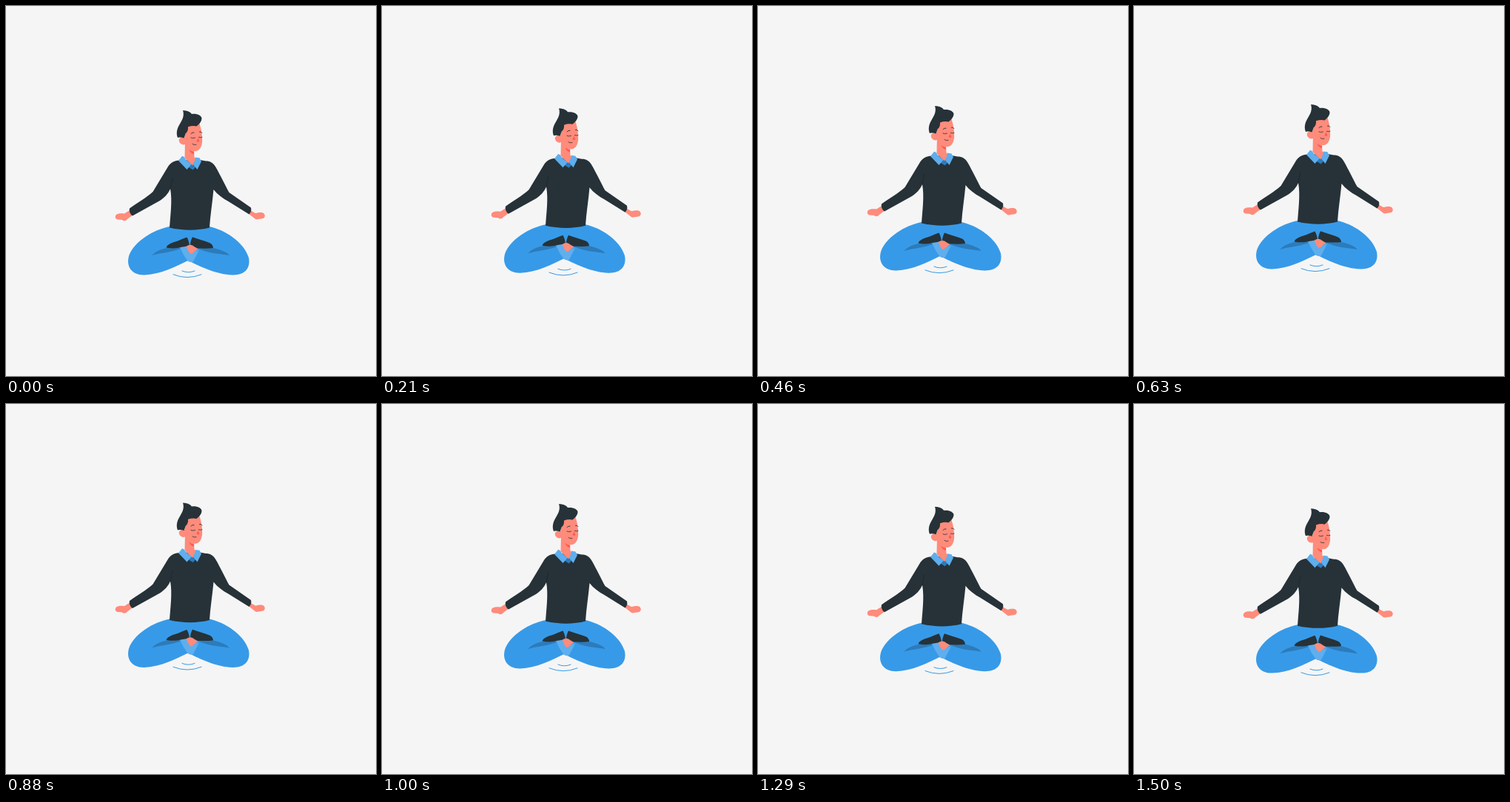
An HTML page that plays this animation: 500x500 px, repeating every 1540 ms.

```html
<!DOCTYPE html>
<html lang="en">
<head>
<meta charset="utf-8">
<title>Floating meditation</title>
<style>
  html, body { margin: 0; width: 100%; height: 100%; overflow: hidden; background: #f5f5f5; }
  svg { display: block; width: 100%; height: 100%; }
  .blue { fill: #379ae8; }
  .fold { fill: #2c7bba; }
  .light { fill: #5faeed; }
  .dark { fill: #263238; }
  .skin { fill: #ff8b7b; }
  .red { fill: #ff5652; }
  .line { fill: none; stroke: #263238; stroke-width: .9; stroke-linecap: round; }
  .arc { fill: none; stroke: #379ae8; stroke-linecap: round; }
</style>
</head>
<body>
<svg viewBox="0 0 500 500">
  <g id="man">
    <!-- legs -->
    <path class="blue" d="M221 298C199 302.500 173 318 166 338C162 353 171 364 187 363.400C208 363 230 352 246 344C262 352 285 363 306 363.400C322 364 331 355 328 340C321 318 295 302.500 275 298Z"/>
    <path class="fold" d="M197 337C203 331 210 328.500 218 327H238C225 333 211 333 197 337Z"/>
    <path class="fold" d="M302 337C298 332 289 329 280 327H258C271 334 289 335 302 337Z"/>
    <path class="light" d="M235 326L243 322L250 333L261 329.500L253 345.500Q249 347 245.500 344.500Q239 336 235 326Z"/>
    <path class="dark" d="M216.500 326.500C218 322 224 320 229 318.500C235 316.500 240 314 244.500 312.500C246.500 316 247.500 320 248 324L236 326C230 328 223 327.500 216.500 326.500Z"/>
    <path class="dark" d="M252 312.300C259 315 269 317.500 276 320.500C279 322.500 280 325 280 327C273 328 265 327.500 259 327.500L249 323.500C249 320 250 316 252 312.300Z"/>
    <path class="skin" d="M243.500 325Q248 321.500 252 323.500L259.500 328.500L255 331.500Q252 335 249 335Q246 331 243.500 325Z"/>

    <!-- hands -->
    <path class="skin" d="M168 275.500L160 280.500C156 280 151 280 149 282C146.500 285 148 288 151 288.500L157 289C159 291 162 290.500 164 288L172 282Z"/>
    <path class="skin" d="M330 276L337 280C342 279 347 278 349 281C351 284 349 287.500 345 287.500L341 288C338 289.500 336 287 334 285.500L327 280Z"/>

    <!-- sweater -->
    <path class="dark" d="M235 208.500C227 209 222 212 219 217L198.500 251C190 259 177 266 167 273.500C166 277 168 282 171 283.500L208 263C214 259 219 254 222 247C225 263 222 283 221 299.500C239 303.700 259 303.700 275 299.500C276 283 279 265 280.500 248C286 255 293 260 300 263.700L328.500 281.500C331 279 332 276 331 272.500L301.500 252C297 244 290 229 283 217C280 212 276 209.500 270 209.500L262 208Z"/>
    <path class="line" style="stroke:#1b2429;stroke-width:.7" d="M225 233Q223 240 222 247"/>

    <!-- neck and collar -->
    <path class="fold" d="M245 212H258L256 218L252.500 221.500L247 218Z"/>
    <path class="skin" d="M242 183L241.500 205Q246 211 252 215Q257 211 257 207L254.500 204L254 194Z"/>
    <path class="red" d="M247.500 194Q251 197 254 197V200Q249 199 247.500 194Z"/>
    <path class="light" d="M238 202.700L233 209L244.500 221L251 213.500Q244 210 240.500 203.700Z"/>
    <path class="light" d="M256 204.500L261.500 205.300L264 210L258.500 221L252.500 213.500Q255.500 210 256 204.500Z"/>

    <!-- head -->
    <path class="skin" d="M245 160L261.500 159C264 166 265.300 175 265.200 182C265 190 261.500 196 256 196.200C250 196.500 245 192 242 187C238 188.500 235 186 234 183C233 179 236 176.500 241 178Z"/>
    <path class="dark" d="M239 141C243 141.400 248 141.800 251 146C256 145.200 263 147 264.400 151C265 155.500 261.500 159.500 257.500 162.500C254 161.500 250 162 246 163.300C246.300 167 245.500 170 242.500 172.500Q241.500 176 240.500 178.500C236 177 233 177.500 232 178C230 173 230.500 167 234 161C238 154 241.500 149 239 141Z"/>
    <path class="red" d="M260 178Q259.500 180.500 261.300 182.800Q259.500 184.500 257.500 183Z"/>
    <path class="line" d="M250 172.500Q251.500 170.500 254 171M261.500 170Q264 169.500 265 171.500"/>
    <path class="line" style="stroke-width:.8" d="M250 178Q252.500 179.300 255.500 178M260.500 177.300Q262.500 178.300 265 177.300M252 186.500Q254 188.300 257 187.300"/>

    <!-- hover marks -->
    <path class="arc" d="M238 358Q246.500 361.500 255 358"/>
    <path class="arc" d="M226 362.800Q245 370.500 264 362.800"/>
  </g>
</svg>
<script>
  const LOOP = 1540, STEP = 1000 / 24;
  const PEAK = 730, HALF = 740, LIFT = 9.5, REST = 0.13;
  const man = document.getElementById('man');

  // steady rise and fall, drawn at 24 pictures a second
  function draw(ms) {
    const t = Math.floor((ms % LOOP + 4.9) / STEP) * STEP;
    const rise = LIFT * Math.max(0, 1 - Math.abs(t - PEAK) / HALF);
    man.setAttribute('transform', `translate(0 ${(REST - rise).toFixed(3)})`);
  }

  const start = performance.now();
  function tick() {
    draw(performance.now() - start);
    requestAnimationFrame(tick);
  }
  tick();
</script>
</body>
</html>
```
